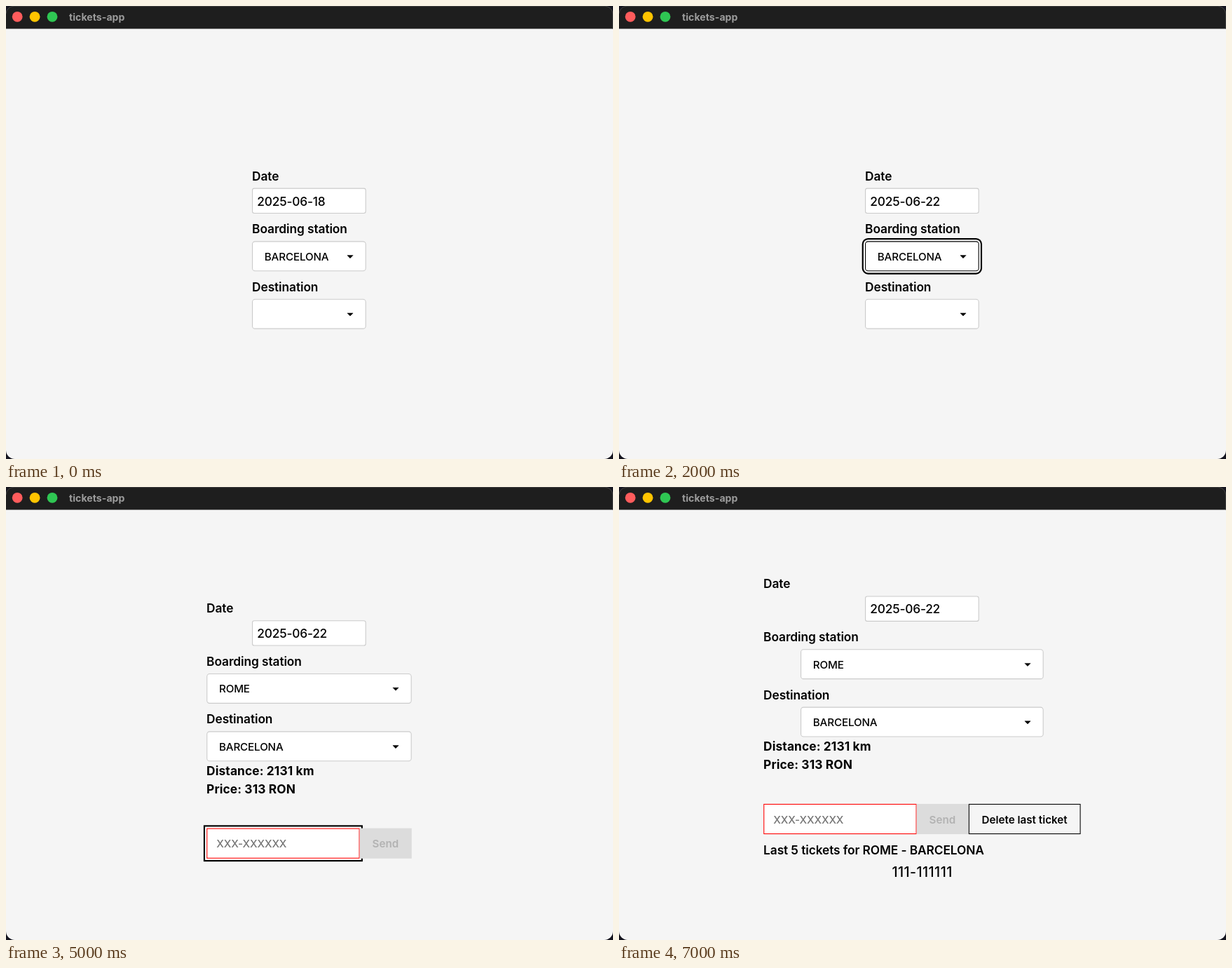
An HTML page that plays this animation: 866 px wide and 646 px high, repeating every 8000 ms.

```html
<!DOCTYPE html>
<html lang="en">
<head>
<meta charset="utf-8">
<title>tickets-app</title>
<style>
  html, body { margin: 0; width: 100%; height: 100%; overflow: hidden; background: #15151f; }
  svg { display: block; width: 100vw; height: 100vh; }
  text { font-family: Inter, "Liberation Sans", sans-serif; font-feature-settings: "calt" 0; white-space: pre; }
  .label { font-size: 17.32px; font-weight: 600; letter-spacing: -.005em; }
  .bold { font-size: 17.32px; font-weight: 700; letter-spacing: .007em; }
  .date { font-size: 17.32px; font-weight: 450; letter-spacing: -.012em; }
  .field { font-size: 15.15px; font-weight: 450; letter-spacing: -.008em; }
  .code { font-size: 15.15px; font-weight: 450; letter-spacing: .025em; }
  .button { font-size: 15.15px; font-weight: 600; letter-spacing: .002em; }
  .ticket { font-size: 19.4px; font-weight: 450; letter-spacing: .025em; }
  .title { font-size: 14.07px; font-weight: 700; letter-spacing: .004em; }
  .cal { font-size: 13px; font-weight: 450; }
  .day { font-size: 13px; font-weight: 600; }
  .mid { text-anchor: middle; }
  .popup { filter: drop-shadow(0 1.5px 2.5px rgba(0, 0, 0, .26)); }
</style>
</head>
<body>
<svg id="stage" viewBox="0 0 866 646" preserveAspectRatio="none"></svg>
<script>
const STEP = 1000;
const BLACK = '#000', GREY = '#cbcbcb';
const SIZE = {
  label: 17.32, bold: 17.32, date: 17.32, field: 15.15, code: 15.15,
  button: 15.15, ticket: 19.4, title: 14.07, cal: 13, day: 13
};

// Text is placed by the middle of its capitals.
const text = (str, x, cy, kind, fill = BLACK, mid = false) =>
  `<text class="${kind}${mid ? ' mid' : ''}" x="${x}" y="${cy + SIZE[kind] * .364}" fill="${fill}">${str}</text>`;

// Box with its stroke inside the edges.
function box(x, y, w, h, { fill = 'none', stroke = 'none', line = 1.08, r = 0, extra = '' } = {}) {
  const d = stroke === 'none' ? 0 : line;
  return `<rect x="${x + d / 2}" y="${y + d / 2}" width="${w - d}" height="${h - d}" rx="${Math.max(0, r - d / 2)}"
    fill="${fill}" stroke="${stroke}" stroke-width="${d}" ${extra}/>`;
}

const ring = (x, y, w, h, r) =>
  box(x - 4.33, y - 4.33, w + 8.66, h + 8.66, { fill: '#fff', stroke: '#000', line: 2.17, r: r && r + 4.33 });

const caret = (cx, cy, w, h, fill) =>
  `<path d="M${cx - w / 2} ${cy - h / 2}h${w}l${-w / 2} ${h}z" fill="${fill}" stroke="${fill}" stroke-width=".5" stroke-linejoin="round"/>`;

function select(x, y, w, value, focused) {
  return (focused ? ring(x, y, w, 43, 4.3) : '') +
    box(x, y, w, 43, { fill: '#fff', stroke: focused ? BLACK : GREY, r: 4.3 }) +
    text(value, x + 17.8, y + 22, 'field') +
    caret(x + w - 22.7, y + 22.3, 8.2, 4.1, BLACK);
}

function dateInput(y, value, focused) {
  const halo = focused ? box(349.3, y - 2, 166.4, 40.2, { fill: '#a5c4f8', r: 5 }) : '';
  return halo +
    box(351, y, 162.7, 36.4, { fill: '#fff', stroke: focused ? '#2168e2' : GREY, line: focused ? 1.6 : 1.08, r: 3.2 }) +
    text(value, 358.3, y + 18.6, 'date');
}

function ticketRow(x, y, { code, focus, last }) {
  const bx = x + 218.4;
  let out = focus ? ring(x, y, 218.4, 43.2, 0) : '';
  out += box(x, y, 218.4, 43.2, { fill: '#fff', stroke: code ? '#008000' : '#f00' });
  out += code ? text(code, x + 14, y + 22.3, 'code') : text('XXX-XXXXXX', x + 14, y + 22.3, 'field', '#757575');
  out += box(bx, y, 74.2, 43.2, code ? { stroke: BLACK } : { fill: '#dcdcdc' });
  out += text('Send', bx + 36.8, y + 22.3, 'button', code ? BLACK : '#b2b2b2', true);
  if (last) {
    out += box(bx + 74.2, y, 159.8, 43.2, { stroke: BLACK });
    out += text('Delete last ticket', bx + 154, y + 22.3, 'button', BLACK, true);
  }
  return out;
}

function form(s) {
  const { x, y, sx, sw } = s;
  let out = text('Date', x - .1, y, 'label') +
    dateInput(y + 17.4, s.date, s.focus === 'date') +
    text('Boarding station', x - .1, y + 75.8, 'label') +
    text('Destination', x - .1, y + 158.2, 'label') +
    select(sx, y + 93.1, sw, s.from, s.focus === 'from') +
    select(sx, y + 175.5, sw, s.to, s.focus === 'to');
  if (s.to) {
    out += text('Distance: 2131 km', x - .1, y + 232, 'bold') +
      text('Price: 313 RON', x - .1, y + 258, 'bold') +
      ticketRow(x, y + 313.8, { code: s.code, focus: s.focus === 'code', last: s.last });
  }
  if (s.last) {
    out += text(`Last 5 tickets for ${s.from} - ${s.to}`, x - .1, y + 379.6, 'label') +
      text(s.last, 432.6, y + 411.3, 'ticket', BLACK, true);
  }
  return out + (s.calendar ? calendar() : '');
}

function calendar() {
  const chevron = (cx, dir) =>
    `<path d="M${cx - 2.4 * dir} 315.2l${4.8 * dir} 5l${-4.8 * dir} 5" fill="none" stroke="#333" stroke-width="1.7"/>`;
  const picker = (x, w, value) =>
    box(x, 307, w, 25.8, { fill: '#fff', stroke: GREY, r: 3.2 }) +
    text(value, x + 6.7, 320, 'cal') + caret(x + w - 13, 320.3, 9, 4.6, '#444');

  let out = box(353, 297.5, 261, 276.5, { fill: '#fff', stroke: '#d6d6d6', line: 1, r: 2.5, extra: 'class="popup"' }) +
    chevron(375.5, -1) + chevron(592.3, 1) +
    picker(392.2, 104.2, 'June') + picker(505, 69.4, '2025');

  const colX = i => 379 + 34.67 * i;
  ['Mo', 'Tu', 'We', 'Th', 'Fr', 'Sa', 'Su'].forEach((d, i) => out += text(d, colX(i), 351, 'day', BLACK, true));

  for (let i = 0; i < 42; i++) {
    const n = i - 5, inside = n > 0 && n < 31;
    const day = n < 1 ? n + 31 : n > 30 ? n - 30 : n;
    const cx = colX(i % 7), cy = 380 + 33.56 * Math.floor(i / 7);
    if (n === 18) out += box(cx - 17.3, cy - 16.6, 34.6, 33.4, { fill: '#d2e1fb', stroke: '#0b69f4', line: 2.17, r: 4.3 });
    if (n === 22) out += box(cx - 17.3, cy - 16.6, 34.6, 33.4, { fill: '#f4f4f4', stroke: '#e6e6e6', r: 4.3 });
    out += text(day, cx, cy, n === 18 ? 'day' : 'cal', inside ? BLACK : '#9b9b9b', true);
  }
  return out;
}

function chrome() {
  const lights = ['#ff5c5c', '#ffc400', '#2fc653'];
  return '<rect width="866" height="646" fill="#15151f"/>' +
    box(0, 0, 866, 646, { fill: '#f5f5f5', r: 12.5 }) +
    '<path d="M0 32.5V11A11 11 0 0 1 11 0H855A11 11 0 0 1 866 11V32.5z" fill="#1e1e1e"/>' +
    '<path d="M0 11A11 11 0 0 1 11 .4H855A11 11 0 0 1 865.6 11V32.5" fill="none" stroke="#4a4a4a" stroke-width=".8"/>' +
    lights.map((c, i) => `<circle cx="${16.2 + 24.9 * i}" cy="15.3" r="7.4" fill="${c}"/>`).join('') +
    text('tickets-app', 90, 15.7, 'title', '#9c9c9c');
}

const small = { x: 351.2, y: 242.2, sx: 351, sw: 162.7, date: '2025-06-18', from: 'BARCELONA', to: '' };
const picked = { ...small, date: '2025-06-22', focus: 'from' };
const medium = { ...picked, x: 286.2, y: 172.8, sx: 286.2, sw: 292.5, from: 'ROME', to: 'BARCELONA', focus: 'to' };
const steps = [
  small,
  { ...small, focus: 'date', calendar: true },
  picked,
  { ...picked, from: 'ROME' },
  medium,
  { ...medium, focus: 'code' },
  { ...medium, focus: 'code', code: '111-111111' },
  { ...medium, x: 206.2, y: 138.1, sx: 259, sw: 346.7, focus: '', last: '111-111111' }
];

const stage = document.getElementById('stage');
stage.innerHTML = chrome() + steps.map(s => `<g class="step" visibility="hidden">${form(s)}</g>`).join('');
const groups = stage.querySelectorAll('.step');
const start = performance.now();
let shown = -1;

function draw(now) {
  const i = Math.floor(Math.max(0, now - start) / STEP) % steps.length;
  if (i !== shown) {
    groups.forEach((g, k) => g.setAttribute('visibility', k === i ? 'visible' : 'hidden'));
    shown = i;
  }
  requestAnimationFrame(draw);
}
draw(start);
</script>
</body>
</html>
```
